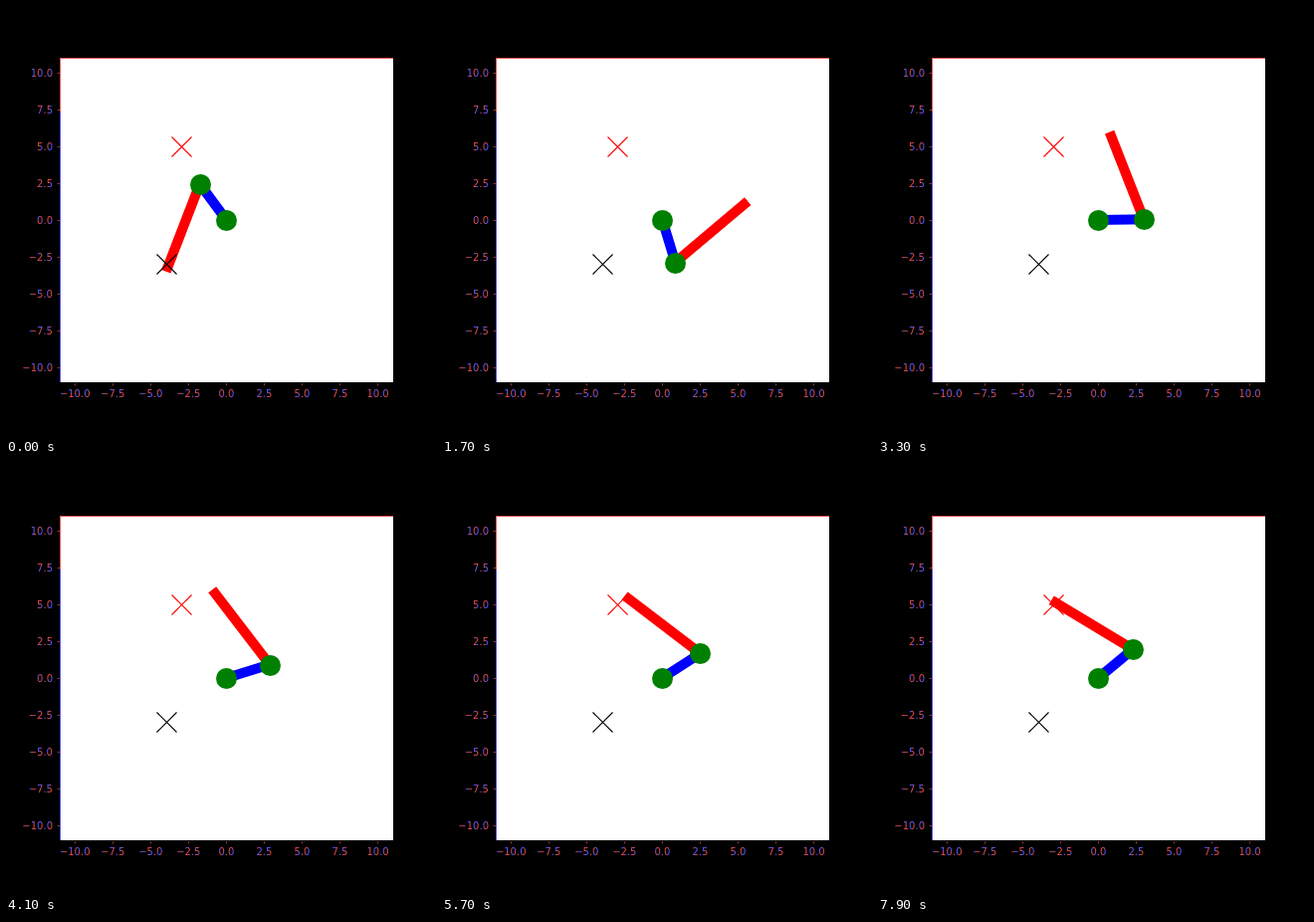
Animation of 432x432 px, one loop 8 s. Source, as an HTML page:

```html
<!DOCTYPE html>
<html lang="en">
<head>
<meta charset="utf-8">
<title>Two-link arm</title>
<style>
  html, body { margin: 0; width: 100%; height: 100%; overflow: hidden; background: #000; }
  svg { display: block; width: 100vw; height: 100vh; }
  text { font: 10px "DejaVu Sans", sans-serif; fill: url(#fringe); }
  .bar { stroke-width: 10; stroke-linecap: square; }
  .joint { fill: #008000; }
</style>
</head>
<body>
<svg viewBox="0 0 432 432">
  <defs>
    <linearGradient id="fringe" gradientUnits="userSpaceOnUse" x1="0" y1="0" x2="7" y2="3" spreadMethod="repeat">
      <stop offset="0" stop-color="#e64a4a"/>
      <stop offset=".55" stop-color="#e64a4a"/>
      <stop offset=".55" stop-color="#5a5aff"/>
      <stop offset="1" stop-color="#5a5aff"/>
    </linearGradient>
  </defs>
  <rect x="54" y="52" width="335" height="326" fill="#fff"/>
  <path d="M54 52.5H389" stroke="#f55"/>
  <path d="M54.5 53V106" stroke="#f55"/>
  <path d="M54.5 106V378" stroke="#55f"/>
  <g id="axes"></g>
  <path id="goal" stroke="#f00" stroke-width="1.1"/>
  <line id="upper" class="bar" stroke="#00f"/>
  <line id="lower" class="bar" stroke="#f00"/>
  <path id="start" stroke="#000" stroke-width="1.1"/>
  <circle id="base" class="joint" r="10.5"/>
  <circle id="elbow" class="joint" r="10.5"/>
</svg>
<script>
const LOOP = 8000, STEP = 100;
const L1 = 3, L2 = 6;
const byId = id => document.getElementById(id);
const px = x => 221.4 + x * 334.8 / 22;
const py = y => 214.92 - y * 326.16 / 22;
// Markers sit on whole pixels
const snap = v => Math.round(v) + 0.5;

function set(el, attrs) {
  for (const key in attrs) el.setAttribute(key, attrs[key]);
}

function add(name, attrs, label = "") {
  const el = document.createElementNS("http://www.w3.org/2000/svg", name);
  set(el, attrs);
  el.textContent = label;
  byId("axes").append(el);
}

function drawAxes() {
  for (let v = -10; v <= 10; v += 2.5) {
    const label = v.toFixed(1).replace("-", "\u2212");
    const x = Math.floor(px(v)) + 0.5, y = snap(py(v));
    add("path", { d: `M${x} 379v2.5`, stroke: "#a44", "stroke-width": 0.8 });
    add("path", { d: `M51.5 ${y}h2.5`, stroke: "#a44", "stroke-width": 0.8 });
    add("text", { x: px(v), y: 393, "text-anchor": "middle" }, label);
    add("text", { x: 47, y: py(v) + 4, "text-anchor": "end" }, label);
  }
}

function cross(id, x, y) {
  const cx = snap(px(x)), cy = snap(py(y));
  set(byId(id), { d: `M${cx - 10} ${cy - 10}l20 20m0 -20l-20 20` });
}

function joint(id, x, y) {
  set(byId(id), { cx: snap(px(x)), cy: snap(py(y)) });
}

function segment(id, x1, y1, x2, y2) {
  set(byId(id), { x1: px(x1), y1: py(y1), x2: px(x2), y2: py(y2) });
}

// Joint angles that put the tip on a point
function solve(x, y) {
  const bend = Math.acos((x * x + y * y - L1 * L1 - L2 * L2) / (2 * L1 * L2));
  const lead = Math.atan2(L2 * Math.sin(bend), L1 + L2 * Math.cos(bend));
  return [Math.atan2(y, x) - lead, bend];
}

const from = solve(-4, -3);
const to = solve(-3, 5);
const turn = 2 * Math.PI;
while (from[0] < 0) from[0] += turn;
while (to[0] < from[0]) to[0] += turn;

// Overdamped approach: the share of the turn still to go after n steps
const remaining = n => 1.337 * 0.9376 ** n - 0.337 * 0.782 ** n;

function draw(time) {
  const rest = remaining(Math.floor(time % LOOP / STEP) + 1);
  const [a, bend] = to.map((end, i) => end + (from[i] - end) * rest);
  const ex = L1 * Math.cos(a), ey = L1 * Math.sin(a);
  segment("upper", 0, 0, ex, ey);
  segment("lower", ex, ey, ex + L2 * Math.cos(a + bend), ey + L2 * Math.sin(a + bend));
  joint("elbow", ex, ey);
}

drawAxes();
cross("goal", -3, 5);
cross("start", -4, -3);
joint("base", 0, 0);

const t0 = performance.now();
function tick() {
  draw(performance.now() - t0);
  requestAnimationFrame(tick);
}
tick();
</script>
</body>
</html>
```
